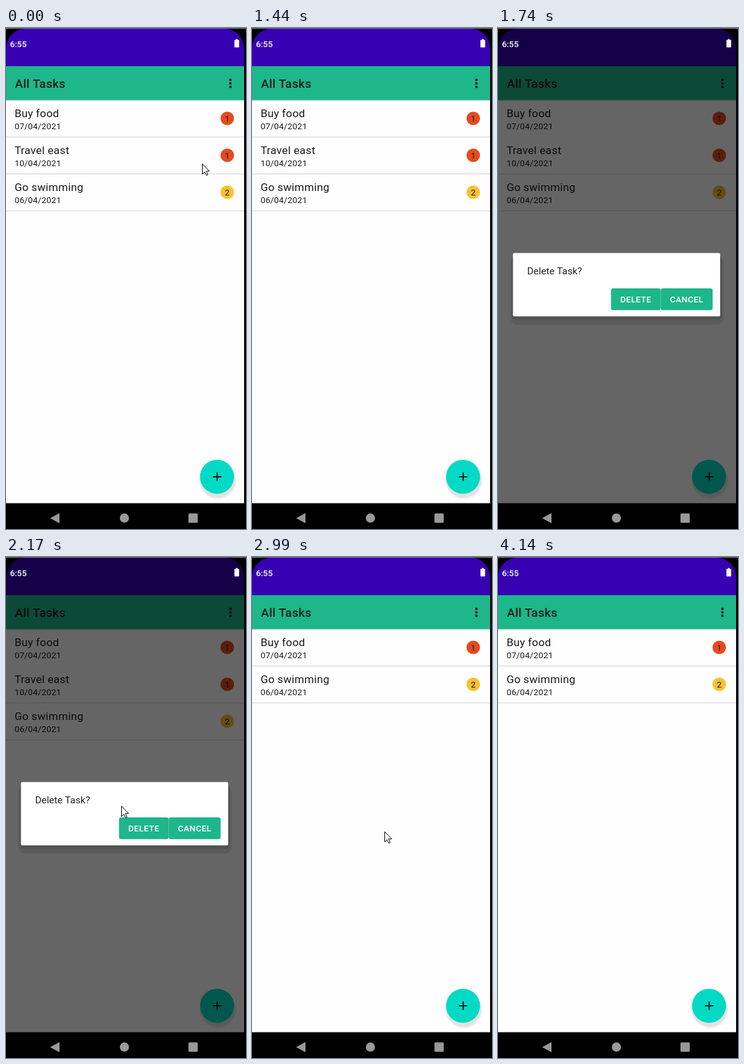
Animation of 377 by 787 pixels, one loop 4420 ms. Source, as an HTML page with a canvas:

```html
<!DOCTYPE html>
<html lang="en">
<head>
<meta charset="utf-8">
<title>Task list</title>
<style>
  html, body { margin: 0; width: 100%; height: 100%; overflow: hidden; background: #000; }
  canvas { display: block; width: 377px; height: 787px; }
</style>
</head>
<body>
<canvas id="stage" width="377" height="787"></canvas>
<script>
const ctx = document.getElementById('stage').getContext('2d');
const LOOP = 4420;
const SCREEN_W = 374;
const ROW_H = 58;
const GREEN = '#1eb68b';
const INK = '#1a1a1a';

const tasks = [
  { name: 'Buy food', date: '07/04/2021', level: 1 },
  { name: 'Travel east', date: '10/04/2021', level: 1 },
  { name: 'Go swimming', date: '06/04/2021', level: 2 }
];
const levelColor = { 1: '#e64a1e', 2: '#fbc02d' };

// Each entry: start time, then the value held until the next entry.
const pointer = [
  [0, [308, 213]], [580, [307, 213]], [730, [215, 224]], [850, [100, 216]], [1000, null],
  [2170, [181, 391]], [2290, [194, 410]], [2420, [204, 425]], [2540, [208, 431]],
  [3570, [226, 536]], [3710, [112, 640]], [3840, [125, 662]], [3990, [126, 661]], [4140, null]
];
const swipe = [[0, 0], [730, -92], [850, -208], [1000, -313.5], [1150, -400], [1440, 0]];
const dim = [[0, 0], [1590, 0.33], [1740, 0.6], [2990, 0]];

function at(track, t) {
  let value = track[0][1];
  for (const [start, v] of track) if (t >= start) value = v;
  return value;
}

function rect(x, y, w, h, color, r = 0) {
  ctx.fillStyle = color;
  ctx.beginPath();
  ctx.roundRect(x, y, w, h, r);
  ctx.fill();
}

function circle(x, y, r, color) {
  ctx.fillStyle = color;
  ctx.beginPath();
  ctx.arc(x, y, r, 0, Math.PI * 2);
  ctx.fill();
}

function polygon(points, color, outline) {
  ctx.beginPath();
  points.forEach(([x, y]) => ctx.lineTo(x, y));
  ctx.closePath();
  ctx.fillStyle = color;
  ctx.fill();
  if (outline) {
    ctx.strokeStyle = outline;
    ctx.lineWidth = 1;
    ctx.stroke();
  }
}

function text(str, x, y, size, { color = INK, weight = 400, spacing = 0, align = 'left' } = {}) {
  ctx.font = `${weight} ${size}px Roboto, sans-serif`;
  ctx.letterSpacing = spacing + 'px';
  ctx.textAlign = align;
  ctx.fillStyle = color;
  ctx.fillText(str, x, y);
}

function drawBars() {
  rect(0, 1, SCREEN_W, 90, '#3700b3', [31, 31, 0, 0]);
  rect(0, 60, SCREEN_W, 687, '#fefefe');
  rect(0, 60, SCREEN_W, 53.5, GREEN);
  rect(0, 113.5, SCREEN_W, 1.5, '#d9e0dd');
  text('All Tasks', 14, 94.3, 19.1, { color: '#0d1f19', weight: 500, spacing: 0.22 });
  for (const y of [81.6, 87, 92.4]) circle(352.5, y, 2, '#0d1f19');
}

function drawRow(task, index, dx) {
  const y = index * ROW_H;
  const x = 13.4 + dx;
  text(task.name, x, 139.6 + y, 17.2, { spacing: 0.28 });
  text(task.date, x, 159 + y, 13.36, { spacing: 0.22 });
  circle(347.6 + dx, 142 + y, 10.6, levelColor[task.level]);
  text(task.level, 347.6 + dx, 146.8 + y, 13.4, { align: 'center' });
}

function drawFab() {
  circle(333, 711.5, 28.8, 'rgba(0,0,0,0.05)');
  circle(332.5, 710, 27.8, 'rgba(0,0,0,0.06)');
  circle(331.5, 705, 26.7, '#03dac5');
  rect(325, 704, 13.4, 1.9, '#111');
  rect(330.8, 698.2, 1.9, 13.4, '#111');
}

function drawList(t) {
  const deleted = t >= 2990;
  const shown = deleted ? tasks.filter((_, i) => i !== 1) : tasks;
  const dx = at(swipe, t);
  const covered = at(dim, t) === 0.6;
  shown.forEach((task, i) => {
    drawRow(task, i, !deleted && i === 1 ? dx : 0);
    if (!(covered && i === 0)) rect(0, 170.5 + i * ROW_H, SCREEN_W, 1.5, '#dfdfdf');
  });
}

function drawButton(label, x, w) {
  rect(x, 409, w, 34.3, GREEN, 3.5);
  text(label, x + w / 2, 431.3, 13.36, { color: '#fff', weight: 500, spacing: 0.35, align: 'center' });
}

function drawDialog(alpha) {
  rect(19.5, 359, 335, 107, 'rgba(0,0,0,0.09)', 11);
  rect(21.5, 357, 330, 102, 'rgba(0,0,0,0.1)', 7);
  ctx.globalAlpha = alpha;
  rect(23.5, 353.5, 325.5, 99.5, '#fff', 2);
  text('Delete Task?', 45.8, 387.4, 15.27, { color: '#222' });
  drawButton('DELETE', 177.5, 78);
  drawButton('CANCEL', 255.5, 81.7);
  ctx.globalAlpha = 1;
}

function drawSystem() {
  text('6:55', 6.2, 29.6, 13.4, { color: '#fff', weight: 500 });
  rect(358.8, 18.8, 7.4, 11.8, '#fff', 0.8);
  rect(361, 17.4, 3, 2, '#fff');
  rect(0, 746.5, 377, 41, '#000');
  polygon([[69.3, 770], [84, 762], [84, 778]], '#999');
  circle(186, 769.8, 7.2, '#999');
  rect(286.6, 762.6, 14.6, 14.6, '#999', 1.5);
}

function drawPointer(x, y) {
  const arrow = [[0, 0], [0, 16], [3.6, 12.6], [6.4, 18], [8.6, 17], [6, 11.4], [11, 11.4]];
  polygon(arrow.map(([px, py]) => [x + px + 0.5, y + py + 0.5]), '#fff', '#000');
}

function draw(t) {
  rect(0, 0, 377, 787, '#000');
  rect(0, 0, 377, 1, '#8c8c8c');
  drawBars();
  drawList(t);
  drawFab();
  const shade = at(dim, t);
  if (shade) {
    rect(0, 1, SCREEN_W, 746, `rgba(0,0,0,${shade})`);
    drawDialog(shade < 0.6 ? 0.95 : 1);
  }
  drawSystem();
  const pos = at(pointer, t);
  if (pos) drawPointer(...pos);
}

const begin = performance.now();
function tick() {
  draw((performance.now() - begin) % LOOP);
  requestAnimationFrame(tick);
}
tick();
</script>
</body>
</html>
```
